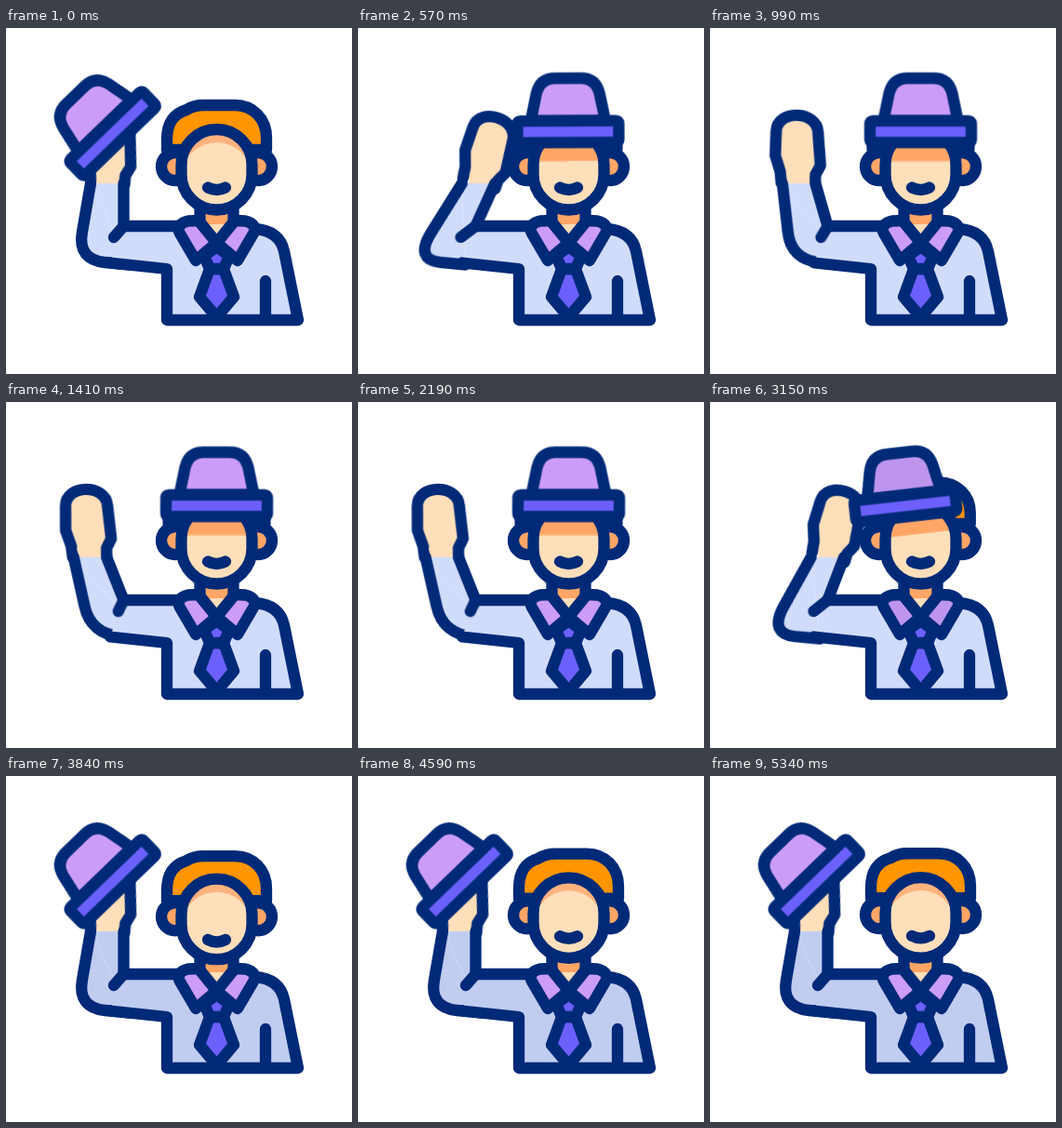
Animation, 372 px wide and 372 px high, one loop 5400 ms. Source, as an HTML page without scripts:

```html
<!DOCTYPE html>
<html lang="en">
<head>
<meta charset="utf-8">
<title>Hat greeting</title>
<style>
html, body { margin: 0; width: 100%; height: 100%; overflow: hidden; background: #fff; }
svg { display: block; width: 100%; height: 100%; }

.line {
  stroke: #002a78; stroke-width: 12.3; stroke-linejoin: round; stroke-linecap: round;
  fill: none; vector-effect: non-scaling-stroke;
}
.skin { fill: #ffdfba; }
.shade { fill: #ffa666; }
.violet { fill: #6c60fc; }
.hair { fill: #ff9500; transform-origin: 226.5px 131px; }
.lilac { fill: #cb9df8; animation: lilac 5.4s step-end infinite; }
.shirt { fill: #d0dcfb; animation: shirt 5.4s step-end infinite; }

.forearm, .hand, .hat, .nod, .hair {
  animation: 5.4s cubic-bezier(.37, 0, .63, 1) infinite;
}
.forearm { animation-name: forearm; transform-origin: 0 213px; }
.hand { animation-name: hand; }
.hat { animation-name: hat; }
.nod { animation-name: nod; }
.hair { animation-name: nod, squash; }

/* poses: hat raised, hand at brim, wave out, wave in */
@keyframes forearm {
  0%, 66.667%, 100% { transform: skewX(0deg); }
  11.111%, 55.556% { transform: skewX(-24.5deg); }
  22.222%, 44.444% { transform: skewX(30.9deg); }
  33.333% { transform: skewX(-3deg); }
}
@keyframes hand {
  0%, 66.667%, 100% { transform: translate(109px, 167px) rotate(5deg); }
  11.111%, 55.556% { transform: translate(130px, 167px) rotate(19deg); }
  22.222%, 44.444% { transform: translate(81.5px, 167px) rotate(-4deg); }
  33.333% { transform: translate(111.5px, 167px) rotate(10deg); }
}
@keyframes hat {
  0%, 66.667%, 100% { transform: translate(114.7px, 113.5px) rotate(-44deg); }
  11.111%, 55.556% { transform: translate(226.5px, 111.5px) rotate(0deg); }
}
@keyframes nod {
  0%, 66.667%, 83.333%, 100% { translate: 0 0; }
  75%, 91.667% { translate: 0 var(--n); }
}
@keyframes squash {
  0%, 7.4%, 59.3%, 100% { scale: 1 1; }
  10.4%, 55.6% { scale: .97 .55; }
}
@keyframes shirt {
  63.889%, 100% { fill: #c0cdf1; }
}
@keyframes lilac {
  53.333% { fill: #bd95ee; }
  63.889%, 100% { fill: #cb9df8; }
}
</style>
</head>
<body>
<svg viewBox="0 0 372 372">
  <defs>
    <path id="face" d="M188.5 147a38 38 0 0 1 76 0V157.5a38 38 0 0 1 -76 0Z"/>
    <clipPath id="inFace"><use href="#face"/></clipPath>
    <path id="collar" d="M207 207L196 207.5Q182 211 187 221L204 250L226.5 231Z"/>
  </defs>

  <!-- arm and body -->
  <path class="line skin hand" d="M-18 0L-19.5 -12L-25.5 -29V-55C-25.5 -79 17.5 -79 19.5 -56L23.5 -20L18.5 -10V0"/>
  <g class="forearm">
    <path class="skin" d="M98 157H121V168H98Z"/>
    <path class="shirt" d="M91 167H127V213L134 254Z"/>
    <path class="line shirt" d="M134 254.5L106 252C88 250 78 240 82 219L91 167"/>
  </g>
  <path class="line shirt" d="M112 252.5L173 259V314H314L299 240Q294 218 268 216L190 213H126"/>
  <path class="line forearm" d="M126.5 167V213L116 225"/>
  <path class="line" d="M279 272V311"/>

  <!-- neck, collar, tie -->
  <path class="skin" d="M208 190H245V207L226.5 231L208 207Z"/>
  <path class="shade" d="M208 190H245V211H208Z"/>
  <path class="line" d="M208.5 192V207M244.5 192V207"/>
  <use href="#collar" class="line lilac"/>
  <use href="#collar" class="line lilac" transform="matrix(-1 0 0 1 453 0)"/>
  <path class="line violet" d="M219 259H234L245 289L226.5 311L208 289Z"/>
  <path class="line violet" d="M226.5 235L240 245L234 259H219L213 245Z"/>

  <!-- head -->
  <g class="nod" style="--n:4px">
    <circle class="line shade" cx="182" cy="149" r="15"/>
    <circle class="line shade" cx="271" cy="149" r="15"/>
  </g>
  <path class="line hair" style="--n:5.5px" d="M173 131V120C173 101 181 92 194 88Q202 83 212 83H246C266 83 280 98 280 118V131Z"/>
  <g class="nod" style="--n:3px">
    <g clip-path="url(#inFace)">
      <use href="#face" fill="#ffb27d"/>
      <use href="#face" class="skin" y="14"/>
      <g class="hat"><rect class="shade" x="-60" width="120" height="31.5"/></g>
    </g>
    <use href="#face" class="line"/>
  </g>
  <path class="line nod" style="--n:8px" d="M217 171.5Q226.5 176.5 236 171.5"/>

  <g class="hat">
    <path class="line lilac" d="M-40 -12L-34 -41Q-30 -57.5 -14 -57.5H14Q30 -57.5 34 -41L40 -12Z"/>
    <rect class="line violet" x="-54.5" y="-11.7" width="109" height="23.4" rx="3"/>
  </g>
</svg>
</body>
</html>
```
